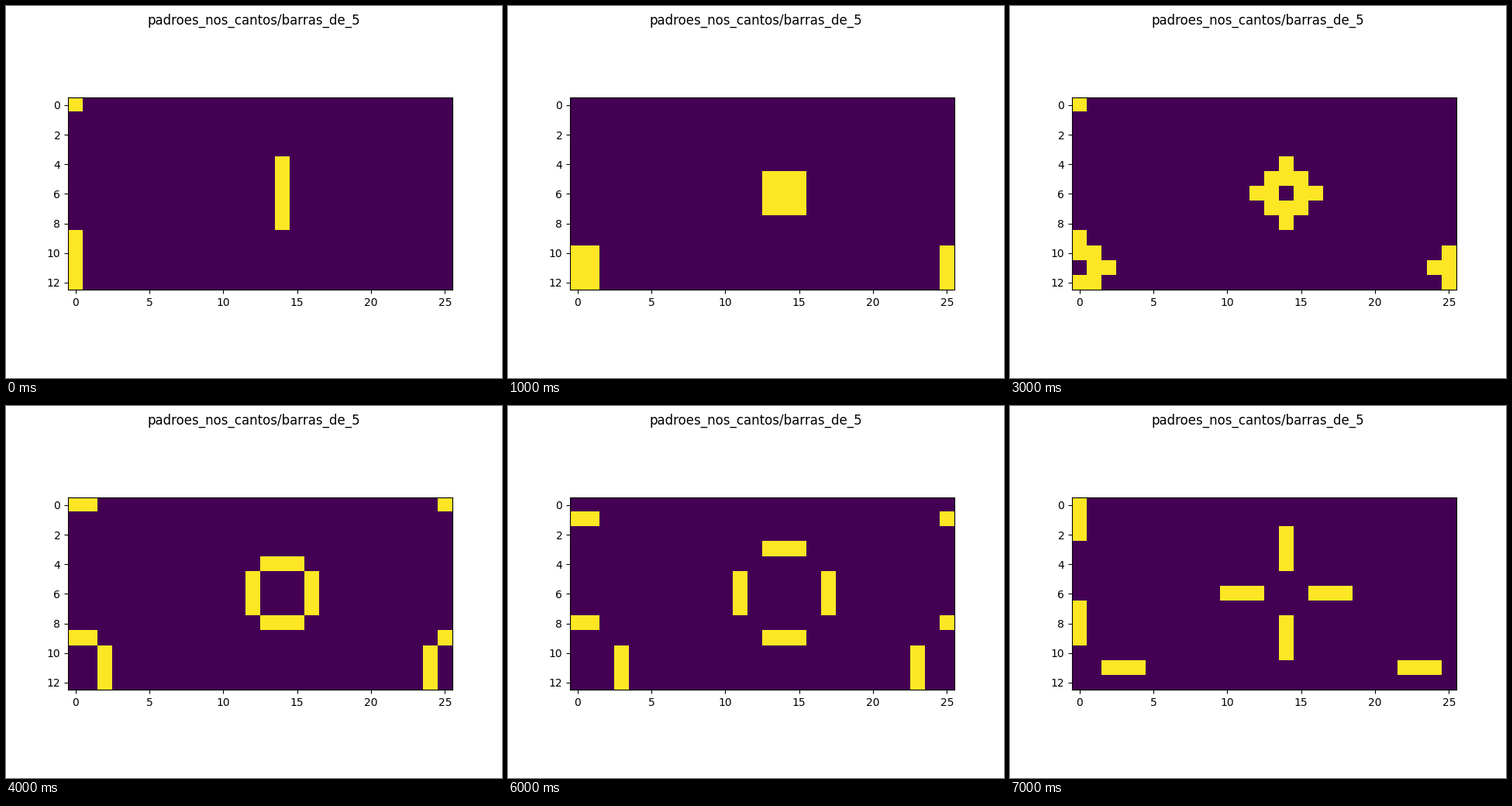
Write a matplotlib script that moves like this. It is 640 by 480 pixels and loops after 8000 ms.

```python
import numpy as np
import matplotlib.pyplot as plt
from matplotlib.animation import FuncAnimation

ROWS, COLS = 13, 26
GENERATIONS = 8
STEP_MS = 1000


def vertical_bar(grid, row, col, length=5):
    """Set a bar of live cells centred on (row, col), wrapping at the edges."""
    rows = (row + np.arange(length) - length // 2) % ROWS
    grid[rows, col] = 1


def next_generation(grid):
    """One step of the Game of Life on a torus."""
    shifts = [(dy, dx) for dy in (-1, 0, 1) for dx in (-1, 0, 1) if (dy, dx) != (0, 0)]
    neighbours = sum(np.roll(grid, s, axis=(0, 1)) for s in shifts)
    alive = (neighbours == 3) | ((grid == 1) & (neighbours == 2))
    return alive.astype(int)


start = np.zeros((ROWS, COLS), dtype=int)
vertical_bar(start, 6, 14)
vertical_bar(start, 11, 0)

history = [start]
while len(history) < GENERATIONS:
    history.append(next_generation(history[-1]))

fig, ax = plt.subplots(figsize=(6.4, 4.8), dpi=100)
fig.suptitle("padroes_nos_cantos/barras_de_5")
image = ax.imshow(start, cmap="viridis", vmin=0, vmax=1, interpolation="nearest")


def update(i):
    image.set_data(history[i])
    return [image]


anim = FuncAnimation(fig, update, frames=GENERATIONS, interval=STEP_MS,
                     init_func=lambda: update(0), repeat=True, repeat_delay=0)
plt.show()
```
